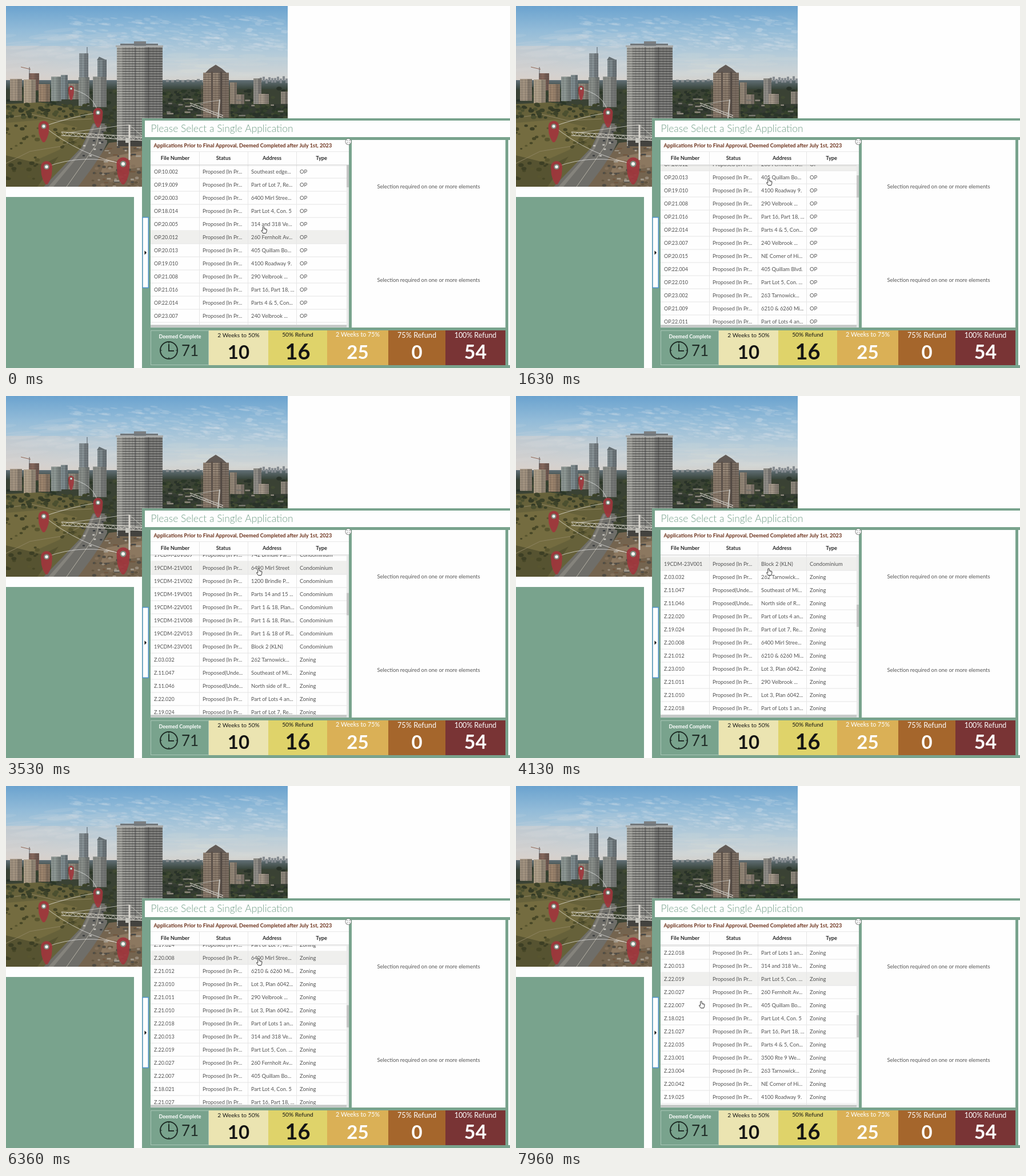
Recreate the animation shown at these times as an HTML page with a canvas. Size 882 by 635 pixels, loop 8000 ms.

```html
<!DOCTYPE html>
<html lang="en">
<head>
<meta charset="utf-8">
<title>Applications dashboard</title>
<style>
  html, body { margin: 0; width: 100%; height: 100%; overflow: hidden; background: #fefefe; }
  canvas { display: block; }
</style>
</head>
<body>
<canvas id="stage" width="882" height="635"></canvas>
<script>
const W = 882, H = 635, LOOP = 8000;
const GREEN = '#79a38d';
const FONT = 'Lato, "Open Sans", sans-serif';
const ROW = 23, TOP = 279, BOTTOM = 559, NOTCH = 62.3;

// file number | address
const rows = `OP.10.002|Southeast edge...
OP.19.009|Part of Lot 7, Re...
OP.20.003|6400 Mirl Stree...
OP.18.014|Part Lot 4, Con. 5
OP.20.005|314 and 318 Ve...
OP.20.012|260 Fernholt Av...
OP.20.013|405 Quillam Bo...
OP.19.010|4100 Roadway 9.
OP.21.008|290 Velbrook ...
OP.21.016|Part 16, Part 18, ...
OP.22.014|Parts 4 & 5, Con...
OP.23.007|240 Velbrook ...
OP.20.015|NE Corner of Hi...
OP.22.004|405 Quillam Blvd.
OP.22.010|Part Lot 5, Con. ...
OP.23.002|263 Tarnowick...
OP.21.009|6210 & 6260 Mi...
OP.22.011|Part of Lots 4 an...
OP.22.009|Part of Lots 1 an...
OP.21.007|Lot 3, Plan 6042...
19CDM-20V009|742 Brindle Par...
19CDM-21V001|6490 Mirl Street
19CDM-21V002|1200 Brindle P...
19CDM-19V001|Parts 14 and 15 ...
19CDM-22V001|Part 1 & 18, Plan...
19CDM-21V008|Part 1 & 18, Plan...
19CDM-22V013|Part 1 & 18 of Pl...
19CDM-23V001|Block 2 (KLN)
Z.03.032|262 Tarnowick...
Z.11.047|Southeast of Mi...
Z.11.046|North side of R...
Z.22.020|Part of Lots 4 an...
Z.19.024|Part of Lot 7, Re...
Z.20.008|6400 Mirl Stree...
Z.21.012|6210 & 6260 Mi...
Z.23.010|Lot 3, Plan 6042...
Z.21.011|290 Velbrook ...
Z.21.010|Lot 3, Plan 6042...
Z.22.018|Part of Lots 1 an...
Z.20.013|314 and 318 Ve...
Z.22.019|Part Lot 5, Con. ...
Z.20.027|260 Fernholt Av...
Z.22.007|405 Quillam Bo...
Z.18.021|Part Lot 4, Con. 5
Z.21.027|Part 16, Part 18, ...
Z.22.035|Parts 4 & 5, Con...
Z.23.001|3500 Rte 9 We...
Z.23.004|263 Tarnowick...
Z.20.042|NE Corner of Hi...
Z.19.025|4100 Roadway 9.
Z.22.040|Part of Lot 7, Re...`.split('\n').map(line => {
  const [file, address] = line.split('|');
  const type = file.startsWith('OP') ? 'OP' : file.startsWith('Z') ? 'Zoning' : 'Condominium';
  const status = file.startsWith('Z.11') ? 'Proposed(Unde...' : 'Proposed (In Pr...';
  return { file, status, address, type };
});

// start, end, wheel notches
const scrolls = [
  [925, 1160, 1], [1472, 1784, 2], [2030, 2360, 2], [2700, 3060, 2], [3425, 3680, 2],
  [3960, 4200, 1], [5085, 5400, 2], [6400, 6630, 1], [7165, 7400, 1]
];

const clamp = v => Math.max(0, Math.min(1, v));
const ease = p => p < .5 ? 4 * p ** 3 : 1 - 4 * (1 - p) ** 3;
const mix = (a, b, p) => a + (b - a) * p;

function scrollAt(t) {
  let sum = 0;
  for (const [a, b, n] of scrolls) sum += n * ease(clamp((t - a) / (b - a)));
  return Math.round(sum * NOTCH);
}

function cursorAt(t) {
  if (t < 4000) {
    const left = (1 - Math.min(1, t / 400)) ** 2;
    return [mix(442, 450.5, left), mix(302.5, 387, left)];
  }
  const p = clamp((t - 7740) / 220) ** 3;
  return [mix(442, 324, p), mix(302.5, 377.5, p)];
}

// Hover lags behind, refreshed every 40 ms
function hoverAt(t) {
  const at = Math.floor((t - 10) / 40) * 40;
  return Math.floor((cursorAt(at)[1] - TOP + scrollAt(at)) / ROW);
}

let c;

function rect(x, y, w, h, color) {
  c.fillStyle = color;
  c.fillRect(x, y, w, h);
}

function poly(color, ...pts) {
  c.fillStyle = color;
  c.beginPath();
  for (let i = 0; i < pts.length; i += 2) c.lineTo(pts[i], pts[i + 1]);
  c.fill();
}

function line(color, width, ...pts) {
  c.strokeStyle = color;
  c.lineWidth = width;
  c.beginPath();
  for (let i = 0; i < pts.length; i += 2) c.lineTo(pts[i], pts[i + 1]);
  c.stroke();
}

function oval(x, y, rx, ry, color, tilt = 0) {
  c.fillStyle = color;
  c.beginPath();
  c.ellipse(x, y, rx, ry, tilt, 0, 7);
  c.fill();
}

function text(str, x, y, size, color = '#525252', weight = 400, align = 'left') {
  c.font = `${weight} ${size}px ${FONT}`;
  c.textAlign = align;
  c.textBaseline = 'alphabetic';
  c.fillStyle = color;
  c.fillText(str, x, y + size * .35);
}

let seed = 7;
function rnd(a = 0, b = 1) {
  seed = (seed * 16807) % 2147483647;
  return a + (b - a) * seed / 2147483647;
}

function scatter(n, x0, y0, x1, y1, r, colors) {
  for (let i = 0; i < n; i++) {
    const s = rnd(.4, 1) * r;
    oval(rnd(x0, x1), rnd(y0, y1), s, s * .7, colors[i % colors.length]);
  }
}

function tower(x, y, w, h, wall, band, step = 3) {
  rect(x, y, w, h, wall);
  c.globalAlpha = .6;
  for (let v = y + 1; v < y + h; v += step) rect(x, v, w, step * .4, band);
  c.globalAlpha = 1;
  for (let u = x + 3; u < x + w; u += 6) rect(u, y + 1, 1, h, 'rgba(45,45,45,.2)');
  rect(x + w * .6, y, w * .4, h, 'rgba(30,32,38,.2)');
}

function lattice(x0, y0, x1, y1, depth, color) {
  const n = Math.round(Math.hypot(x1 - x0, y1 - y0) / 5);
  line(color, 1.1, x0, y0, x1, y1);
  line(color, 1.1, x0, y0 + depth, x1, y1 + depth);
  const zig = [];
  for (let i = 0; i <= n; i++) zig.push(mix(x0, x1, i / n), mix(y0, y1, i / n) + (i % 2) * depth);
  line(color, .8, ...zig);
}

function pin(x, y, r, tip) {
  c.fillStyle = 'rgba(160,54,60,.92)';
  c.beginPath();
  c.arc(x, y, r, Math.PI, 0);
  c.lineTo(x + r * .9, mix(y, tip, .45));
  c.quadraticCurveTo(x + r * .6, tip - 5, x + 1.5, tip);
  c.lineTo(x - 1.5, tip);
  c.quadraticCurveTo(x - r * .6, tip - 5, x - r * .9, mix(y, tip, .45));
  c.fill();
  oval(x, y, r * .48, r * .48, '#7f8d80');
  oval(x, y, r * .26, r * .26, '#fff');
}

function arcLine(x0, y0, cx, cy, x1, y1) {
  c.strokeStyle = 'rgba(255,255,255,.6)';
  c.lineWidth = 1;
  c.beginPath();
  c.moveTo(x0, y0);
  c.quadraticCurveTo(cx, cy, x1, y1);
  c.stroke();
}

function sky() {
  const g = c.createLinearGradient(0, 0, 0, 140);
  g.addColorStop(0, '#6ba3cf');
  g.addColorStop(.3, '#92bbd8');
  g.addColorStop(.6, '#b4cbd9');
  g.addColorStop(.85, '#cdd3d5');
  g.addColorStop(1, '#d9d2c9');
  rect(0, 0, 493, 145, g);
  const warm = c.createLinearGradient(0, 0, 260, 0);
  warm.addColorStop(0, 'rgba(225,205,195,.4)');
  warm.addColorStop(1, 'rgba(225,205,195,0)');
  rect(0, 70, 260, 70, warm);
  for (let i = 0; i < 340; i++) {
    const x = rnd(110, 493), y = rnd(18, 78);
    oval(x, y, rnd(4, 11), rnd(1, 2.4), `rgba(224,230,236,${rnd(.06, .24)})`, .12);
  }
  for (let i = 0; i < 40; i++)
    oval(rnd(0, 200), rnd(40, 115), rnd(15, 40), rnd(2, 5), 'rgba(222,220,222,.12)', -.1);
  for (let i = 0; i < 24; i++)
    oval(rnd(270, 493), rnd(85, 124), rnd(18, 45), rnd(2, 4), 'rgba(222,220,216,.13)');
}

function land() {
  const greens = ['#2b3728', '#36422d', '#414a33', '#293229'];
  rect(0, 136, 493, 181, '#3a4234');
  const far = c.createLinearGradient(0, 129, 0, 146);
  far.addColorStop(0, '#64727a');
  far.addColorStop(1, '#38443a');
  rect(0, 130, 493, 16, far);
  scatter(130, 0, 144, 493, 172, 5, greens);
  for (let x = 444; x < 493; x += 5) rect(x, rnd(123, 128), 4, 8, '#858b90');
  for (let x = 280; x < 345; x += 9) rect(x, rnd(127, 130), 5, 4, '#858a8c');

  tower(7, 128, 21, 38, '#8f8170', '#cbbba6');
  tower(40, 118, 18, 30, '#785a50', '#a08878');
  tower(31, 129, 21, 43, '#9c8d78', '#d4c6b0');
  tower(57, 137, 20, 31, '#8c745f', '#bda78c');
  tower(79, 124, 18, 43, '#7b8583', '#b4bcb5');
  tower(96, 121, 12, 43, '#6e7b80', '#a4b0ae');
  tower(109, 136, 20, 28, '#7d776c', '#b3ada0');
  line('#56585c', 1, 41, 126, 41, 107);
  line('#8f6552', 1, 26, 107, 43, 111);
  tower(128, 83, 16, 92, '#717b80', '#b4bbbc');
  tower(127, 125, 19, 50, '#757b78', '#b2b6ae');
  line('#555e67', 1, 142, 83, 142, 72);
  tower(160, 94, 16, 82, '#6a757b', '#a9b2b3');
  poly('#666f73', 159, 95, 163, 89, 176, 95);
  tower(152, 124, 24, 53, '#777b78', '#b6b8b0');

  tower(392, 134, 12, 46, '#84786a', '#b8aa97');
  tower(433, 127, 14, 49, '#7e7c77', '#b5b0a6');
  tower(442, 154, 18, 30, '#908578', '#c4b8a8');
  tower(481, 150, 12, 35, '#7d776d', '#b2a99b');
  tower(403, 155, 14, 25, '#80756a', '#ada292');

  rect(274, 172, 219, 30, '#343b32');
  scatter(90, 276, 152, 344, 195, 4, greens);
  scatter(90, 392, 174, 493, 197, 5, greens);
  for (let i = 0; i < 22; i++) rect(rnd(278, 480), rnd(162, 192), rnd(5, 12), 2.5, i % 2 ? '#77756e' : '#8f897e');

  poly('#66613a', 0, 172, 60, 169, 150, 185, 158, 205, 138, 245, 70, 317, 0, 317);
  poly('#746c40', 0, 205, 70, 199, 125, 213, 94, 252, 40, 276, 0, 270);
  poly('#565331', 0, 262, 64, 278, 92, 264, 55, 317, 0, 317);
  line('#8d8463', 1, 0, 196, 45, 190, 90, 201, 150, 198);
  line('#8d8360', 1, 0, 276, 42, 255, 96, 246, 140, 225);
  scatter(70, 0, 172, 150, 196, 5, ['#3c4229', '#4c5030', '#343a26']);
  scatter(32, 0, 210, 60, 305, 5, ['#474727', '#58552f', '#3d3f25']);
  scatter(28, 85, 215, 140, 250, 4, ['#54522d', '#464629']);
}

function site() {
  poly('#6f6e69', 152, 206, 176, 206, 177, 240, 140, 317, 66, 317, 132, 248);
  poly('#85837c', 153, 208, 157, 208, 138, 250, 83, 317, 74, 317, 134, 250);
  line('#b5b1a4', 1, 166, 210, 158, 243, 106, 317);
  for (let i = 0; i < 13; i++)
    rect(rnd(132, 168), rnd(212, 268), 4, 2.5, i % 3 ? '#3a3d40' : '#c4c2bc');
  poly('#74644f', 180, 240, 240, 234, 240, 317, 126, 317, 150, 285);
  poly('#8c7860', 176, 266, 238, 254, 238, 282, 165, 294);
  scatter(50, 150, 280, 238, 317, 4, ['#62543f', '#83705a', '#514d45', '#978b7b']);
  for (let i = 0; i < 34; i++)
    rect(rnd(165, 230), rnd(245, 310), rnd(3, 10), rnd(1.5, 3), ['#a39b8d', '#4b4a48', '#71573f'][i % 3]);
  scatter(34, 172, 175, 194, 234, 5, ['#323a2a', '#414830']);
}

function bigTowers() {
  tower(194, 71, 80, 174, '#6b6b68', '#d3d3ce', 4.4);
  rect(194, 71, 10, 174, 'rgba(205,205,198,.25)');
  rect(225, 71, 2, 174, 'rgba(50,50,52,.35)');
  rect(248, 71, 2, 174, 'rgba(40,40,42,.35)');
  rect(192, 69, 83, 3, '#a9abaa');
  rect(224, 62, 21, 8, '#7b7f82');
  rect(200, 66, 66, 3, '#72787c');
  rect(196, 236, 42, 10, '#43423f');

  poly('#625a55', 347, 119, 356, 110, 367, 103, 378, 110, 388, 119);
  tower(345, 117, 45, 78, '#7b6c5f', '#b7a896', 4);
  rect(341, 139, 52, 57, 'rgba(115,101,88,.35)');
  rect(359, 115, 3, 80, '#5b514a');
  rect(375, 115, 3, 80, '#534a44');
}

function photo() {
  c.save();
  c.beginPath();
  c.rect(0, 0, 493, 317);
  c.clip();
  sky();
  land();
  site();
  bigTowers();
  lattice(322, 170, 380, 192, 4, '#c9c6bf');
  line('#c9c7c1', 2, 374, 164, 371, 197);
  line('#c4c2bd', .8, 374, 165, 330, 172);
  lattice(97, 221, 238, 230, 6, '#dcd9d0');
  line('#dcd9d2', 3, 216, 208, 216, 270);
  line('#cfcdc6', .8, 110, 222, 215, 208, 238, 228);
  rect(209, 232, 8, 8, '#c8c7c0');
  arcLine(66, 211, 112, 195, 161, 187);
  arcLine(66, 211, 130, 262, 205, 277);
  arcLine(71, 282, 136, 258, 205, 277);
  arcLine(114, 146, 153, 154, 161, 187);
  pin(114, 145, 5, 165);
  pin(66, 211, 9.5, 239);
  pin(161, 187, 8.5, 213);
  pin(71, 282, 10, 313);
  pin(205, 277, 11.5, 313);
  c.restore();
}

function tile(x, w, color, label, ly, ls, value, vs, ink) {
  rect(x, 569, w, 61, color);
  const mid = x + w / 2;
  text(label, mid, ly, ls, ink, 400, 'center');
  text(value, mid, 607, vs, ink, 700, 'center');
}

function dashboard() {
  rect(0, 335, 224, 300, GREEN);
  rect(238, 197, 644, 438, GREEN);
  rect(243, 201, 639, 29, '#fefefe');
  text('Please Select a Single Application', 253.5, 214.5, 17.4, '#6f9c85', 300);

  rect(253, 235, 347, 329, '#fefefe');
  rect(605, 235, 269, 329, '#fefefe');
  rect(879, 235, 3, 395, '#fefefe');
  text('Selection required on one or more elements', 739.5, 317, 9.4, '#555', 400, 'center');
  text('Selection required on one or more elements', 739.5, 481, 9.4, '#555', 400, 'center');

  rect(238.5, 370, 11.5, 125, '#4d93c9');
  rect(239.7, 371.5, 8.8, 122, '#fefefe');
  poly('#111', 242.5, 429, 246, 432.7, 242.5, 436.4);

  rect(253, 569, 102, 61, '#a9c5b6');
  rect(254, 570, 100, 59, GREEN);
  text('Deemed Complete', 304.5, 579.5, 8.9, '#fff', 700, 'center');
  c.strokeStyle = '#1f2c26';
  c.lineWidth = 2;
  c.beginPath();
  c.arc(285, 604, 15, 0, 7);
  c.stroke();
  line('#1f2c26', 2, 285, 593, 285, 605, 294, 605);
  for (const [dx, dy] of [[0, -1], [1, 0], [0, 1], [-1, 0]])
    line('#1f2c26', 1.2, 285 + dx * 12, 604 + dy * 12, 285 + dx * 14, 604 + dy * 14);
  text('71', 322, 605, 26, '#1f2c26', 400, 'center');

  tile(355, 104, '#ebe4b1', '2 Weeks to 50%', 577, 10.2, '10', 33, '#151515');
  tile(459, 103, '#dfd36a', '50% Refund', 576, 10.2, '16', 38, '#151515');
  tile(562, 107, '#dab056', '2 Weeks to 75%', 576.5, 10.7, '25', 33, '#fff');
  tile(669, 100, '#a5662c', '75% Refund', 577.5, 12.7, '0', 33, '#fff');
  tile(769, 105, '#793435', '100% Refund', 577.5, 12.4, '54', 34, '#fff');
}

function tableHead() {
  rect(253, 235, 347, 44, '#fefefe');
  text('Applications Prior to Final Approval, Deemed Completed after July 1st, 2023', 258.5, 245, 9.2, '#6a2f18', 700);
  rect(253, 255, 347, 1, '#e8e8e8');
  ['File Number', 'Status', 'Address', 'Type'].forEach((name, i) => {
    text(name, [296, 380.5, 465.5, 552][i], 266.5, 9.2, '#2b2b2b', 700, 'center');
    if (i) rect(253 + 85 * i, 256, 1, 23, '#e6e6e6');
  });
  rect(253, 278, 347, 1, '#dcdcdc');
  rect(253, 279, 343, 2, 'rgba(0,0,0,.06)');
  oval(599, 238, 5.5, 5.5, '#777');
  oval(599, 238, 4.7, 4.7, '#fefefe');
  line('#444', .9, 596.5, 235.5, 601.5, 240.5);
  line('#444', .9, 601.5, 235.5, 596.5, 240.5);
  rect(598, 237, 2, 2, '#fefefe');
}

function tableBody(t) {
  const s = scrollAt(t), hover = hoverAt(t);
  c.save();
  c.beginPath();
  c.rect(253, TOP, 347, BOTTOM - TOP);
  c.clip();
  rect(253, TOP, 343, BOTTOM - TOP, '#fefefe');
  rows.forEach((row, i) => {
    const y = TOP + i * ROW - s;
    if (y < TOP - ROW || y > BOTTOM) return;
    if (i === hover) rect(253, y, 343, ROW, '#efefed');
    rect(253, y + ROW - .5, 343, 1, '#e6e6e6');
    text(row.file, 259, y + 11.5, 9);
    text(row.status, 344, y + 11.5, 9.4);
    text(row.address, 429, y + 11.5, 9.3);
    text(row.type, 514, y + 11.5, 9.4);
  });
  for (let x = 338; x < 520; x += 85) rect(x, TOP, 1, 280, '#e6e6e6');
  rect(596, TOP, 4, 280, '#e9e9e9');
  rect(596, TOP + s * .141, 4, 39, '#c6c6c6');
  c.restore();
  rect(253, 559, 347, 5, '#e4e6e5');
  rect(253, 559.5, 343, 4, '#c3c7c5');
}

function hand(x, y) {
  c.save();
  c.translate(x, y);
  c.beginPath();
  c.moveTo(-1.2, 7);
  c.lineTo(-1.2, .8);
  c.quadraticCurveTo(0, -.8, 1.2, .8);
  c.lineTo(1.2, 4);
  c.lineTo(4.6, 4.6);
  c.quadraticCurveTo(6, 4.9, 6, 6.2);
  c.lineTo(5.6, 9);
  c.lineTo(4.6, 12);
  c.lineTo(-.6, 12);
  c.lineTo(-3.6, 7.6);
  c.quadraticCurveTo(-3.4, 6, -1.2, 7.6);
  c.closePath();
  c.fillStyle = '#fff';
  c.fill();
  c.strokeStyle = '#333';
  c.lineWidth = 1;
  c.stroke();
  line('#555', .6, 2.8, 4.4, 2.8, 6.6);
  line('#555', .6, 4.4, 4.8, 4.4, 6.8);
  c.restore();
}

const view = document.getElementById('stage').getContext('2d');
const back = document.createElement('canvas');
back.width = W;
back.height = H;
c = back.getContext('2d');
rect(0, 0, W, H, '#fefefe');
photo();
dashboard();
c = view;

const begin = performance.now();
function frame() {
  const t = (performance.now() - begin) % LOOP;
  c.drawImage(back, 0, 0);
  tableBody(t);
  tableHead();
  hand(...cursorAt(t));
  requestAnimationFrame(frame);
}
frame();
</script>
</body>
</html>
```
